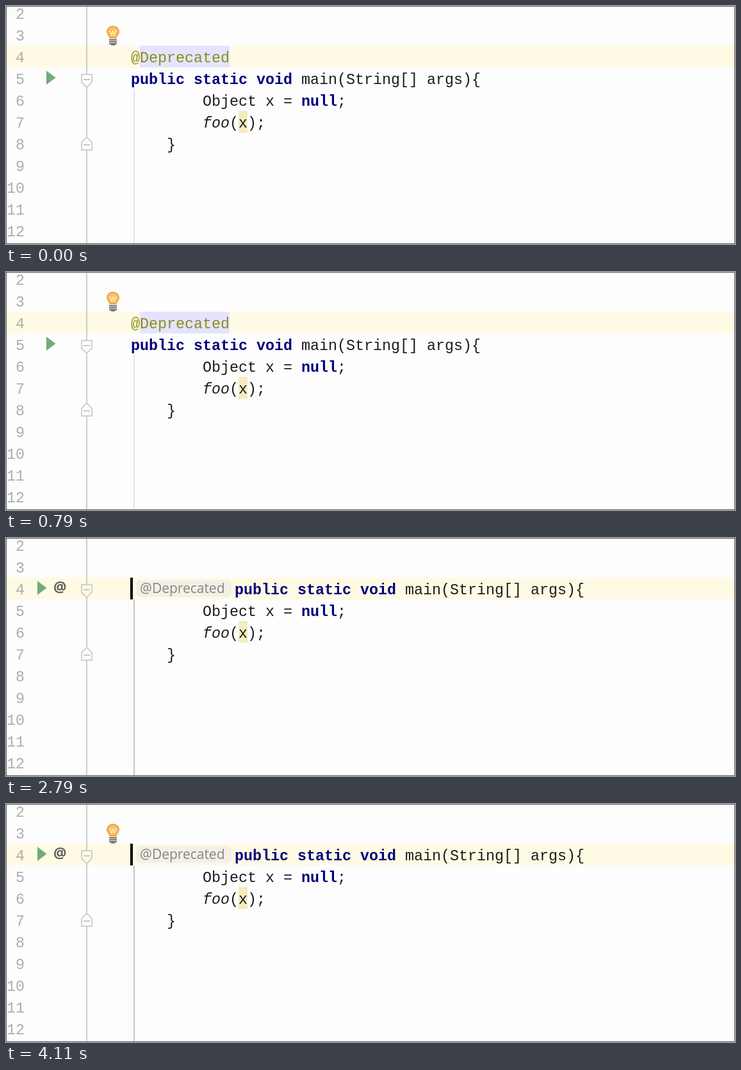
Recreate the animation shown at these times as an HTML page. Size 1138x372 px, loop 4.21 s.

```html
<!DOCTYPE html>
<html lang="en">
<head>
<meta charset="utf-8">
<title>Editor: external annotation</title>
<style>
html, body { margin: 0; width: 100%; height: 100%; overflow: hidden; background: #fdfdfd; }
svg { display: block; width: 100%; height: 100%; }
text { white-space: pre; }
.code { font: 23.333px "Courier New", "Liberation Mono", monospace; }
.ui { font: 22.8px "Open Sans", "Noto Sans", sans-serif; }
.key { font-weight: bold; fill: #000080; }
.it { font-style: italic; }
</style>
</head>
<body>
<svg id="stage" viewBox="0 0 1138 372"></svg>
<script>
const LOOP = 4210, ROW = 34, COL = 14, LEFT = 195;
const MENU = [
  "Annotate externally",
  "Annotate @interface 'Deprecated' as @Deprecated",
  "Generate overloaded method with default parameter values",
  "Make 'private'",
  "Make 'protected'",
  "Make package-private"
];

const rowTop = n => 62 + (n - 4) * ROW;
const rect = (x, y, w, h, fill, more = "") =>
  `<rect x="${x}" y="${y}" width="${w}" height="${h}" fill="${fill}" ${more}/>`;
const path = (d, fill, more = "") => `<path d="${d}" fill="${fill}" ${more}/>`;
const label = (x, y, body, cls, fill, more = "") =>
  `<text x="${x}" y="${y}" class="${cls}" fill="${fill}" ${more}>${body}</text>`;
const code = (x, n, body, fill = "#1c1c1c", more = "") => label(x, rowTop(n) + 26, body, "code", fill, more);
const key = s => `<tspan class="key">${s}</tspan>`;
const caret = x => rect(x, 62, 4, ROW, "#000");
const play = (x, n) => path(`M${x} ${rowTop(n) + 5}l14.500 11l-14.500 11z`, "#70ad7b");

// Fold handle: dir 1 points down, -1 points up
function fold(n, dir, fill) {
  const mid = rowTop(n) + 19;
  return path(`M118 ${mid - 8 * dir}h16v${12 * dir}l-8 ${8 * dir}l-8 ${-8 * dir}z`, fill,
    'stroke="#d0d0d0" stroke-width="2"') + rect(121, mid - 1, 10, 2, "#c8c8c8");
}

function bulb() {
  return path("M162.500 50C162.500 46 158 45 158 40.500A9 8.800 0 0 1 176 40.500C176 45 171.500 46 171.500 50z", "#f9c069",
      'stroke="#f0a043" stroke-width="2"') +
    path("M162 38l3 7l2-6l2 6l3-7", "none", 'stroke="#fff0b8" stroke-width="1.500"') +
    [52, 55, 58].map(y => rect(161, y, 12, 2, "#6a6a6a")).join("") + rect(164, 60, 6, 1.5, "#6a6a6a");
}

function pencil(y, letter) {
  let s = "";
  if (letter) s = label(300, y + 14, "R", "ui", "#707070", 'style="font-weight:bold;font-size:20px"');
  else for (let i = 0; i < 6; i++) s += rect(302, y + i * 3, 17 - Math.max(0, i - 2) * 3, 1.5, "#858585");
  return s + `<g transform="translate(304 ${y + 23}) rotate(-45)">` +
    path("M0 0l7-4.500v9z", "#e9c99a") + path("M0 0l3-2v4z", "#333") +
    rect(7, -4.5, 15, 9, "#3f9b3c") + rect(7, -2.5, 15, 3, "#83cf6b") +
    rect(22, -4.5, 4, 9, "#397f38") + "</g>";
}

function menu() {
  return rect(292, 96, 720, 229, "#fff", 'stroke="#808080" stroke-width="2"') +
    rect(293, 97, 718, 37, "#1b7bc5") +
    MENU.map((s, i) => {
      const y = 97 + i * 38;
      return pencil(y + 6, i === 2) + label(337, y + 27, s, "ui", i ? "#000" : "#fff") +
        path(`M989 ${y + 9}l12 8l-12 8z`, i ? "#919191" : "#fff");
    }).join("");
}

function scene(s) {
  const main = s.edited ? 4 : 5;
  const shift = s.hint ? 162 : 0;
  const mark = rowTop(main + 2);
  let out = rect(0, 0, 1138, 372, "#fdfdfd") + rect(0, 62, 1138, ROW, "#fffae3");

  if (s.edited && !s.hint) out += rect(63, 96, 62, 230, "#f0f0f0");
  out += rect(125, 0, 2, 372, "#cdcdcd");
  out += rect(199, rowTop(main + 1), 2, 372, s.hint ? "#c4c4c4" : "#e4e4e4");
  for (let n = 2; n <= 12; n++) out += code(29, n, n, "#adadad", 'text-anchor="end"');
  out += fold(main, 1, s.edited ? "#fffae3" : "#fdfdfd") + fold(main + 3, -1, "#fdfdfd");
  out += play(s.hint ? 49 : 63, main);

  if (!s.edited) out += rect(209, 62, 140, ROW, "#e4e4ff") + code(LEFT, 4, "@Deprecated", "#8c8c1c");
  if (s.hint) {
    out += label(74, 85, "@", "ui", "#5f5f5f", 'style="font-weight:bold"') +
      rect(203, 66, 149, 26, "#f3f0e5", 'rx="7"') +
      label(209, 86, "@Deprecated", "ui", "#858585", 'style="font-size:21px"');
  }
  out += rect(363, mark, COL, ROW, "#f6ebbc");
  out += code(LEFT + shift, main, key("public static void") + " main(String[] args){");
  out += code(LEFT + 8 * COL, main + 1, "Object x = " + key("null") + ";");
  out += code(LEFT + 8 * COL, main + 2, '<tspan class="it">foo</tspan>(x);');
  out += code(LEFT + 4 * COL, main + 3, "}");

  if (s.bulb) out += bulb();
  if (s.menu) out += menu();
  if (s.caret) out += caret(s.edited ? 194 : 292);
  return out + rect(0.5, 0.5, 1137, 371, "none", 'stroke="#5a5a5a"');
}

const within = (t, a, b) => t >= a && t < b;
const stateAt = t => ({
  edited: t >= 2540,
  hint: t >= 2790,
  menu: within(t, 1200, 2540),
  bulb: t < 1200 || t >= 3480,
  caret: within(t, 270, 790) || within(t, 2540, 3600) || t >= 4110
});

const stage = document.getElementById("stage");
const start = performance.now();
let shown = "";
function tick() {
  const state = stateAt((performance.now() - start) % LOOP);
  const id = JSON.stringify(state);
  if (id !== shown) {
    shown = id;
    stage.innerHTML = scene(state);
  }
  requestAnimationFrame(tick);
}
tick();
</script>
</body>
</html>
```
